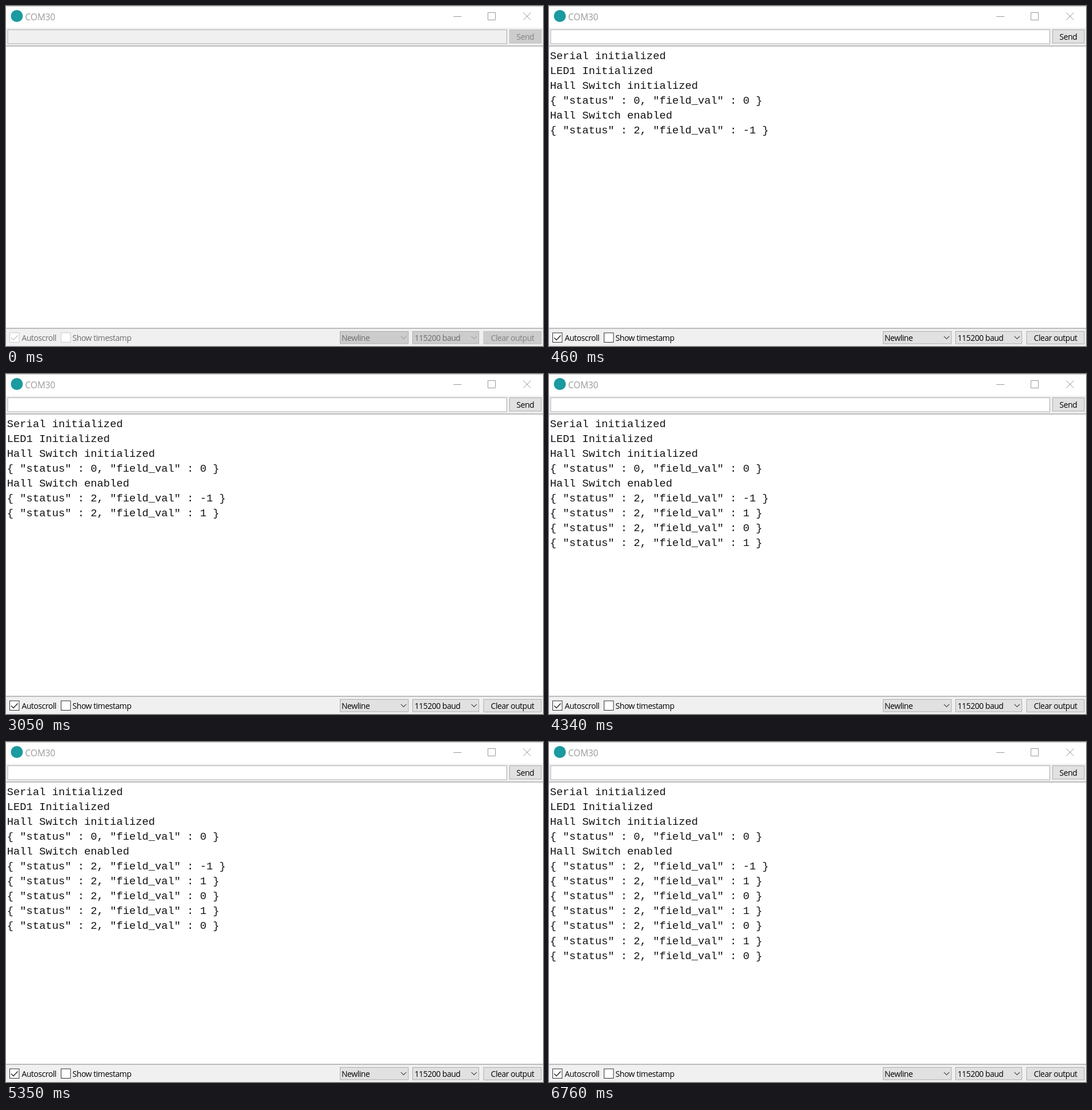
These frames come from a looping animation (941x595 px, 8780 ms). An HTML page:

```html
<!DOCTYPE html>
<html lang="en">
<head>
<meta charset="utf-8">
<title>Serial monitor</title>
<style>
  html, body { margin: 0; width: 100%; height: 100%; overflow: hidden; background: #fff; }
  svg { display: block; width: 941px; height: 595px; }
  .ui { font: 14px "Open Sans", "Noto Sans", sans-serif; letter-spacing: -0.45px; }
  .title { font: 15.4px "Open Sans", "Noto Sans", sans-serif; fill: #999; }
  .log { font: 18.8px "Liberation Mono", "Courier New", monospace; fill: #111; }
  .icon { fill: none; stroke: #999; }
  .field { fill: #fff; stroke: #ababab; }
  .button { fill: #e1e1e1; stroke: #adadad; }
  .box { fill: #fff; stroke: #333; }
  .mark { fill: none; stroke: #222; stroke-width: 1.4; }
  .arrow { fill: none; stroke: #444; stroke-width: 1.1; }
  .off .field { fill: #f0f0f0; }
  .off .button { fill: #ccc; stroke: #bfbfbf; }
  .off .combo { stroke: #adadad; }
  .off .box { stroke: #ccc; }
  .off .mark { stroke: #c4c4c4; }
  .off .arrow { stroke: #a0a0a0; }
  .off .ui text { fill: #6d6d6d; }
  .off .ui .label { fill: #838383; }
</style>
</head>
<body>
<svg id="stage" viewBox="0 0 941 595" class="off">
  <rect width="941" height="595" fill="#fff"/>
  <rect width="941" height="1" fill="#c3c3c3"/>
  <circle cx="19" cy="17.5" r="10.5" fill="#1a9aa1"/>
  <text class="title" x="33.5" y="24.5">COM30</text>
  <path class="icon" d="M784 18.5h14M844.5 11.5h13v13h-13zM906.5 11.5l13 13M919.5 11.5l-13 13"/>

  <rect y="38" width="941" height="32" fill="#f0f0f0"/>
  <rect y="69.5" width="941" height="1" fill="#828282"/>
  <rect y="564" width="941" height="31" fill="#f0f0f0"/>
  <rect y="563.5" width="941" height="1" fill="#828282"/>

  <rect class="field" x="3" y="41.5" width="874.5" height="24.5"/>
  <g class="ui">
    <rect class="button" x="882.5" y="41.5" width="55.5" height="23.5"/>
    <text class="label" x="894.5" y="58.5">Send</text>

    <rect class="box" x="6.5" y="572" width="16.5" height="16.5"/>
    <path class="mark" d="M9 580.5l4 4 7.5-8"/>
    <text x="27.5" y="585.5">Autoscroll</text>
    <rect class="box" x="96.5" y="572" width="16.5" height="16.5"/>
    <text x="116.5" y="585.5">Show timestamp</text>

    <rect class="button combo" x="585.5" y="569.5" width="119.5" height="21.5"/>
    <text x="588" y="585.5">Newline</text>
    <path class="arrow" d="M692 577.8l4.7 4.7 4.7-4.7"/>
    <rect class="button combo" x="712.5" y="569.5" width="116" height="21.5"/>
    <text x="716" y="585.5">115200 baud</text>
    <path class="arrow" d="M815.5 577.8l4.7 4.7 4.7-4.7"/>
    <rect class="button" x="837" y="569.5" width="101" height="22"/>
    <text class="label" x="849.5" y="585.5">Clear output</text>
  </g>
  <g id="log" class="log"></g>
</svg>
<script>
  const LOOP = 8780, ENABLED_AT = 70, BOOT_AT = 460;
  const reading = (status, value) => `{ "status" : ${status}, "field_val" : ${value} }`;

  const lines = [
    "Serial initialized",
    "LED1 Initialized",
    "Hall Switch initialized",
    reading(0, 0),
    "Hall Switch enabled",
    reading(2, -1)
  ].map(text => ({ at: BOOT_AT, text }));

  // The switch alternates between 1 and 0 after start-up.
  [3050, 3560, 4340, 5350, 5900, 6760].forEach((at, i) =>
    lines.push({ at, text: reading(2, (i + 1) % 2) }));

  const stage = document.getElementById("stage");
  const log = document.getElementById("log");

  lines.forEach((line, i) => {
    const node = document.createElementNS("http://www.w3.org/2000/svg", "text");
    node.setAttribute("x", 1.8);
    node.setAttribute("y", 93 + 26.05 * i);
    node.textContent = line.text;
    line.node = log.appendChild(node);
  });

  function draw(t) {
    stage.classList.toggle("off", t < ENABLED_AT);
    for (const { node, at } of lines)
      node.setAttribute("visibility", t >= at ? "visible" : "hidden");
  }

  const start = performance.now();
  function tick() {
    draw((performance.now() - start) % LOOP);
    requestAnimationFrame(tick);
  }
  tick();
</script>
</body>
</html>
```
